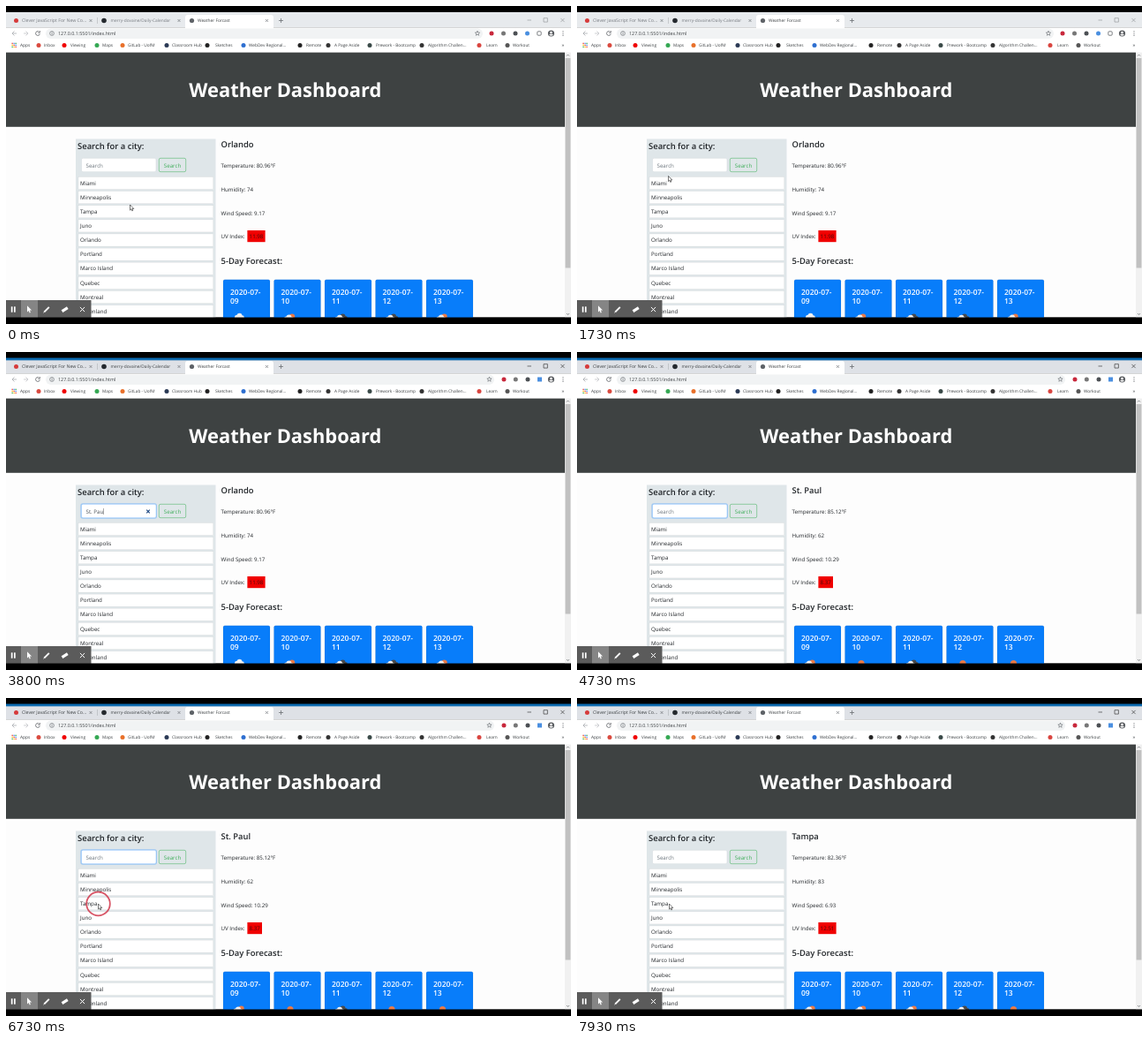
An HTML page with a canvas for the animation above (8 s loop, 640 by 360 pixels).

```html
<!DOCTYPE html>
<html lang="en">
<head>
<meta charset="utf-8">
<title>Weather Dashboard</title>
<style>
html, body { margin: 0; width: 100%; height: 100%; overflow: hidden; background: #000; }
canvas { display: block; width: 100vw; height: 100vh; }
</style>
</head>
<body>
<canvas id="stage"></canvas>
<script>
const W = 640, H = 360, LOOP = 8000;
const canvas = document.getElementById('stage');
const ctx = canvas.getContext('2d');

const INK = '#212529', GREY = '#5f6368', BLUE = '#087dfa';
const ACTIVE_AT = 2200, FOCUS_AT = 2260, CLEAR_AT = 4330, BLUR_AT = 6800;
const QUERY = 'St. Paul';
const KEYS = [2800, 2930, 3060, 3260, 3400, 3600, 3730, 3870];
const CITIES = ['Miami', 'Minneapolis', 'Tampa', 'Juno', 'Orlando', 'Portland',
  'Marco Island', 'Quebec', 'Montreal', 'Greenland'];
const REPORTS = [
  { at: 0, city: 'Orlando', temp: '80.96', hum: '74', wind: '9.17', uv: '11.98',
    sky: ['cloud', 'mixed', 'dark', 'dark', 'mixed'] },
  { at: 4460, city: 'St. Paul', temp: '85.12', hum: '62', wind: '10.29', uv: '8.37',
    sky: ['mixed', 'sun', 'dark', 'sun', 'sun'] },
  { at: 7130, city: 'Tampa', temp: '82.36', hum: '83', wind: '6.93', uv: '12.51',
    sky: ['mixed', 'mixed', 'mixed', 'dark', 'sun'] }
];
const BOOKMARKS = [
  [37, 43, '#d94a3f', 'Inbox'], [66, 73, '#f00000', 'Viewing'], [103, 109, '#34a853', 'Maps'],
  [132, 138, '#e8702a', 'GitLab - UofM'], [182, 188, '#2b3a55', 'Classroom Hub'],
  [228, 237, '#222', 'Sketches'], [269, 275, '#2e6fd0', 'WebDev Regional...'],
  [333, 340, '#222', 'Remote'], [365, 372, '#333', 'A Page Aside'],
  [412, 419, '#3a4a48', 'Prework - Bootcamp'], [471, 478, '#333', 'Algorithm Challen...'],
  [536, 544, '#d9453f', 'Learn'], [568, 574, '#555', 'Workout']
];
// Pointer path: time, x, y
const PATH = [[60, 140.5, 225], [460, 126, 213], [600, 126, 213], [1000, 108, 197],
  [1200, 108, 197], [1530, 103.5, 192.5], [1730, 103.5, 192.5], [2060, 91, 180],
  [5330, 91, 180], [6130, 104, 227], [6460, 104.5, 233]];

function rect(x, y, w, h, fill) {
  ctx.fillStyle = fill;
  ctx.fillRect(x, y, w, h);
}

function round(x, y, w, h, r, fill, stroke, width = 0.45) {
  ctx.beginPath();
  ctx.roundRect(x, y, w, h, r);
  if (fill) { ctx.fillStyle = fill; ctx.fill(); }
  if (stroke) { ctx.strokeStyle = stroke; ctx.lineWidth = width; ctx.stroke(); }
}

function dot(x, y, r, fill) {
  ctx.beginPath();
  ctx.arc(x, y, r, 0, Math.PI * 2);
  ctx.fillStyle = fill;
  ctx.fill();
}

function line(points, color, width = 0.8) {
  ctx.beginPath();
  points.forEach(([x, y], i) => i ? ctx.lineTo(x, y) : ctx.moveTo(x, y));
  ctx.strokeStyle = color;
  ctx.lineWidth = width;
  ctx.stroke();
}

function cross(x, y, r, color, width) {
  line([[x - r, y - r], [x + r, y + r]], color, width);
  line([[x - r, y + r], [x + r, y - r]], color, width);
}

// y is the middle of the capitals
function text(str, x, y, size, color = INK, weight = 400, align = 'left') {
  ctx.font = `${weight} ${size}px "Open Sans", "Noto Sans", sans-serif`;
  ctx.textAlign = align;
  ctx.fillStyle = color;
  ctx.fillText(str, x, y + size * 0.357);
}

function drawTabs(active) {
  const tone = active ? '#3c4043' : '#777b80';
  const strip = active ? '#dee1e6' : '#e7eaed';
  rect(0, 7, W, 17.5, strip);
  if (active) rect(0, 6.6, W, 2.8, '#0a68ad');
  round(203, 10, 100, 16, [3, 3, 0, 0], '#fff');
  dot(11.5, 16.5, 2.5, '#d63b3b');
  dot(111, 16.5, 2.8, '#24292e');
  dot(210.5, 16.5, 2.6, GREY);
  text('Clever JavaScript For New Co...', 18, 16.5, 5.2, tone);
  rect(93, 10, 9, 13, strip);
  text('merry-dovaine/Daily-Calendar', 118.5, 16.5, 4.85, tone);
  text('Weather Forcast', 217, 16.5, 4.85, '#3c4043');
  [96, 196, 295.5].forEach(x => cross(x, 16.5, 1.5, GREY, 0.6));
  line([[103.5, 13], [103.5, 20]], '#a5a8ad', 0.5);
  line([[309, 16.5], [314, 16.5]], GREY, 0.7);
  line([[311.5, 14], [311.5, 19]], GREY, 0.7);
  const ctl = active ? '#222' : '#8a8d91';
  line([[590.5, 16], [595, 16]], ctl, 0.6);
  round(609, 13.7, 4.4, 4.4, 0, null, ctl, 0.6);
  cross(630.5, 16, 2.1, ctl, 0.6);
}

function drawArrow(x, dir, color) {
  line([[x - 2.5, 31], [x + 2.5, 31]], color);
  line([[x, 28.5], [x + dir * 2.5, 31], [x, 33.5]], color);
}

function drawStar(x) {
  ctx.beginPath();
  for (let i = 0; i < 10; i++) {
    const r = i % 2 ? 1.2 : 2.8, a = i * Math.PI / 5 - Math.PI / 2;
    ctx.lineTo(x + r * Math.cos(a), 31 + r * Math.sin(a));
  }
  ctx.closePath();
  ctx.strokeStyle = GREY;
  ctx.lineWidth = 0.6;
  ctx.stroke();
}

function drawToolbar(active) {
  rect(0, 24.3, W, 28.7, '#fff');
  drawArrow(9.5, -1, '#a9acb0');
  drawArrow(22.5, 1, '#c3c5c8');
  ctx.beginPath();
  ctx.arc(36, 31, 2.4, 0.2, 5.3);
  ctx.strokeStyle = GREY;
  ctx.lineWidth = 0.8;
  ctx.stroke();
  line([[38.3, 28], [38.3, 30.2], [36.2, 30.2]], GREY);
  const end = active ? 553 : 540;
  round(45, 25.5, end - 45, 11.4, 5.7, '#f1f3f4');
  ctx.beginPath();
  ctx.arc(52, 31, 2.4, 0, Math.PI * 2);
  ctx.strokeStyle = GREY;
  ctx.lineWidth = 0.6;
  ctx.stroke();
  rect(51.7, 30.6, 0.7, 1.7, GREY);
  rect(51.7, 29.4, 0.7, 0.7, GREY);
  text('127.0.0.1:5501/index.html', 59, 31, 5.4, '#3c4043');
  drawStar(active ? 547.5 : 534);
  const icons = active
    ? [[564, '#c8283c'], [577.3, '#777'], [591, '#4c5054']]
    : [[550, '#c8283c'], [563.5, '#777'], [577, '#4c5054'], [590.5, '#4a8fe0']];
  icons.forEach(([x, c]) => dot(x, 31, 2.5, c));
  if (active) rect(602, 28.5, 5, 5, '#4a8fe0');
  else round(601.8, 28.8, 4.4, 4.4, 1, null, GREY, 0.8);
  dot(617.5, 31, 3.6, '#5a5d61');
  dot(617.5, 30, 1.3, '#fff');
  round(615.5, 31.7, 4, 1.8, 0.9, '#fff');
  [28.8, 31, 33.2].forEach(y => dot(631, y, 0.6, GREY));
}

function drawBookmarks() {
  const hues = ['#ea4335', '#4285f4', '#34a853', '#fbbc05'];
  for (let i = 0; i < 9; i++)
    rect(6.5 + (i % 3) * 2, 41.7 + Math.floor(i / 3) * 2, 1.3, 1.3, hues[i % 4]);
  text('Apps', 16, 44.5, 4.8, '#3c4043');
  for (const [ix, tx, color, name] of BOOKMARKS) {
    dot(ix, 44.5, 2.5, color);
    text(name, tx, 44.5, 4.75, '#3c4043');
  }
  text('»', 629.5, 44, 5.4, '#3c4043');
}

function typedAt(t) {
  return t < CLEAR_AT ? QUERY.slice(0, KEYS.filter(k => k <= t).length) : '';
}

function drawSearch(t) {
  rect(79, 150.5, 158.5, 202, '#dfe6e9');
  text('Search for a city:', 81, 159, 9.45, INK, 600);
  const focused = t >= FOCUS_AT && t < BLUR_AT;
  if (focused) round(84.3, 171.3, 86.7, 17.4, 2.6, 'rgba(0,123,255,.28)');
  round(85.5, 172.3, 84.5, 15.4, 1.7, '#fff', focused ? '#80bdff' : '#ced4da');
  const typed = typedAt(t);
  if (typed) {
    text(typed, 90.5, 180.5, 6.16, '#495057');
    cross(161, 180.5, 1.8, '#1c4680', 1.1);
  } else {
    text('Search', 90.5, 180.5, 6.16, '#6c757d');
  }
  const lastKey = KEYS.filter(k => k <= t).pop() || FOCUS_AT;
  const since = t - (t >= CLEAR_AT ? CLEAR_AT - 265 : lastKey);
  if (focused && since % 1060 < 530) {
    const w = typed ? ctx.measureText(typed).width : 0;
    rect(90.4 + w, 177, 0.45, 7, '#444');
  }
  round(173.3, 172.3, 30.4, 15.4, 1.7, null, '#28a745');
  text('Search', 188.5, 180.5, 6.16, '#3fae59', 400, 'center');
  CITIES.forEach((city, i) => {
    const y = 193.5 + i * 16.13;
    rect(82, y, 152.7, 14, '#fff');
    ctx.strokeStyle = 'rgba(0,0,0,.1)';
    ctx.lineWidth = 0.4;
    ctx.strokeRect(82, y, 152.7, 14);
    text(city, 84, y + 7, 6.2);
  });
}

function drawCloud(x, y, color) {
  dot(x - 3, y + 1.5, 2.5, color);
  dot(x, y, 3, color);
  dot(x + 3, y + 1.8, 2.3, color);
}

function drawSky(kind, x) {
  const sun = '#ec7a45', pale = '#f2f2f2';
  if (kind === 'sun') dot(x, 352.6, 3.6, sun);
  if (kind === 'mixed') {
    dot(x + 2, 351.6, 3.2, sun);
    drawCloud(x - 1.5, 352.4, pale);
  }
  if (kind === 'dark') {
    drawCloud(x + 2, 351.4, '#484849');
    drawCloud(x - 1.5, 352.8, pale);
  }
  if (kind === 'cloud') drawCloud(x, 350.8, pale);
}

function drawReport(t) {
  const r = REPORTS.filter(p => p.at <= t).pop();
  text(r.city, 243.5, 157, 9.4, INK, 600);
  text(`Temperature: ${r.temp}°F`, 243.5, 181, 6.16);
  text(`Humidity: ${r.hum}`, 243.5, 208, 6.16);
  text(`Wind Speed: ${r.wind}`, 243.5, 234.5, 6.16);
  text('UV Index:', 243.5, 261, 6.16);
  rect(273.4, 254, r.uv.length > 4 ? 20.2 : 16.6, 13.2, '#f00000');
  text(r.uv, 275.6, 261, 6.2, '#4a0a0c');
  text('5-Day Forecast:', 243.5, 289, 9.45, INK, 600);
  r.sky.forEach((kind, i) => {
    const x = 246 + i * 57.5;
    round(x, 309.8, 53, 50, 1.7, BLUE, 'rgba(0,0,0,.125)');
    text('2020-07-', x + 8, 324, 8.5, '#fff', 600);
    text(String(9 + i).padStart(2, '0'), x + 8, 334, 8.5, '#fff', 600);
    drawSky(kind, x + 18.5);
  });
}

function drawPage(t) {
  rect(0, 52.6, W, 300, '#fdfdfd');
  rect(0, 52.6, 633, 84.2, '#3e4242');
  text('Weather Dashboard', 316.3, 95, 21.9, '#fff', 700, 'center');
  drawSearch(t);
  drawReport(t);
  rect(633, 52.6, 7, 300, '#f1f1f1');
  rect(633.6, 59, 5.8, 237.5, '#c1c1c1');
  line([[635, 56.5], [636.5, 55], [638, 56.5]], GREY, 0.7);
  line([[635, 348], [636.5, 349.5], [638, 348]], GREY, 0.7);
}

function drawRecorder() {
  rect(0, 333, 96.5, 20, '#5b5b5b');
  rect(17, 333, 19, 20, '#858585');
  rect(5.8, 340.3, 1.7, 6.4, '#fff');
  rect(9, 340.3, 1.7, 6.4, '#fff');
  arrowShape(24, 339.2, 1.05);
  ctx.fillStyle = '#fff';
  ctx.fill();
  line([[43.3, 346.3], [48.8, 340.8]], '#fff', 1.9);
  line([[42.4, 347.2], [43.6, 346]], '#fff', 0.9);
  line([[63.5, 345.6], [69.8, 341.6]], '#fff', 3.2);
  cross(86.5, 343.5, 2.6, '#fff', 1);
}

function arrowShape(x, y, k) {
  const pts = [[0, 0], [0, 7], [1.6, 5.5], [2.6, 7.9], [3.7, 7.4], [2.7, 5.1], [4.9, 5.1]];
  ctx.beginPath();
  pts.forEach(([dx, dy]) => ctx.lineTo(x + dx * k, y + dy * k));
  ctx.closePath();
}

function pointerAt(t) {
  let a = PATH[0];
  for (const b of PATH) {
    if (t < b[0]) {
      const p = Math.max(0, (t - a[0]) / (b[0] - a[0] || 1));
      const e = p * p * (3 - 2 * p);
      return [a[1] + (b[1] - a[1]) * e, a[2] + (b[2] - a[2]) * e];
    }
    a = b;
  }
  return [a[1], a[2]];
}

function drawPointer(t) {
  if (t >= KEYS[0] && t < 5330) return;
  const [x, y] = pointerAt(t);
  const inField = x > 85 && x < 170 && y > 172 && y < 188;
  if (inField) {
    line([[x, y - 3.3], [x, y + 3.3]], '#777', 0.4);
    line([[x - 1.2, y - 3.5], [x + 1.2, y - 3.5]], '#777', 0.4);
    line([[x - 1.2, y + 3.5], [x + 1.2, y + 3.5]], '#777', 0.4);
  } else {
    arrowShape(x, y, 0.88);
    ctx.fillStyle = '#fff';
    ctx.fill();
    ctx.strokeStyle = '#222';
    ctx.lineWidth = 0.6;
    ctx.stroke();
  }
  if ((t >= 2200 && t < 2430) || (t >= 6700 && t < 6930)) {
    ctx.beginPath();
    ctx.arc(x, y, 13.3, 0, Math.PI * 2);
    ctx.strokeStyle = 'rgba(208,48,68,.82)';
    ctx.lineWidth = 1.8;
    ctx.stroke();
  }
}

function draw(t) {
  const dpr = window.devicePixelRatio || 1;
  const w = Math.round(innerWidth * dpr), h = Math.round(innerHeight * dpr);
  if (canvas.width !== w || canvas.height !== h) {
    canvas.width = w;
    canvas.height = h;
  }
  ctx.setTransform(w / W, 0, 0, h / H, 0, 0);
  ctx.textRendering = 'geometricPrecision';
  const active = t >= ACTIVE_AT;
  rect(0, 0, W, H, '#000');
  drawTabs(active);
  drawToolbar(active);
  drawBookmarks();
  drawPage(t);
  drawRecorder();
  drawPointer(t);
  rect(0, 352.5, W, 7.5, '#000');
}

let start;
function tick(now) {
  start ??= now;
  draw(Math.max(0, now - start) % LOOP);
  requestAnimationFrame(tick);
}
requestAnimationFrame(tick);
</script>
</body>
</html>
```
